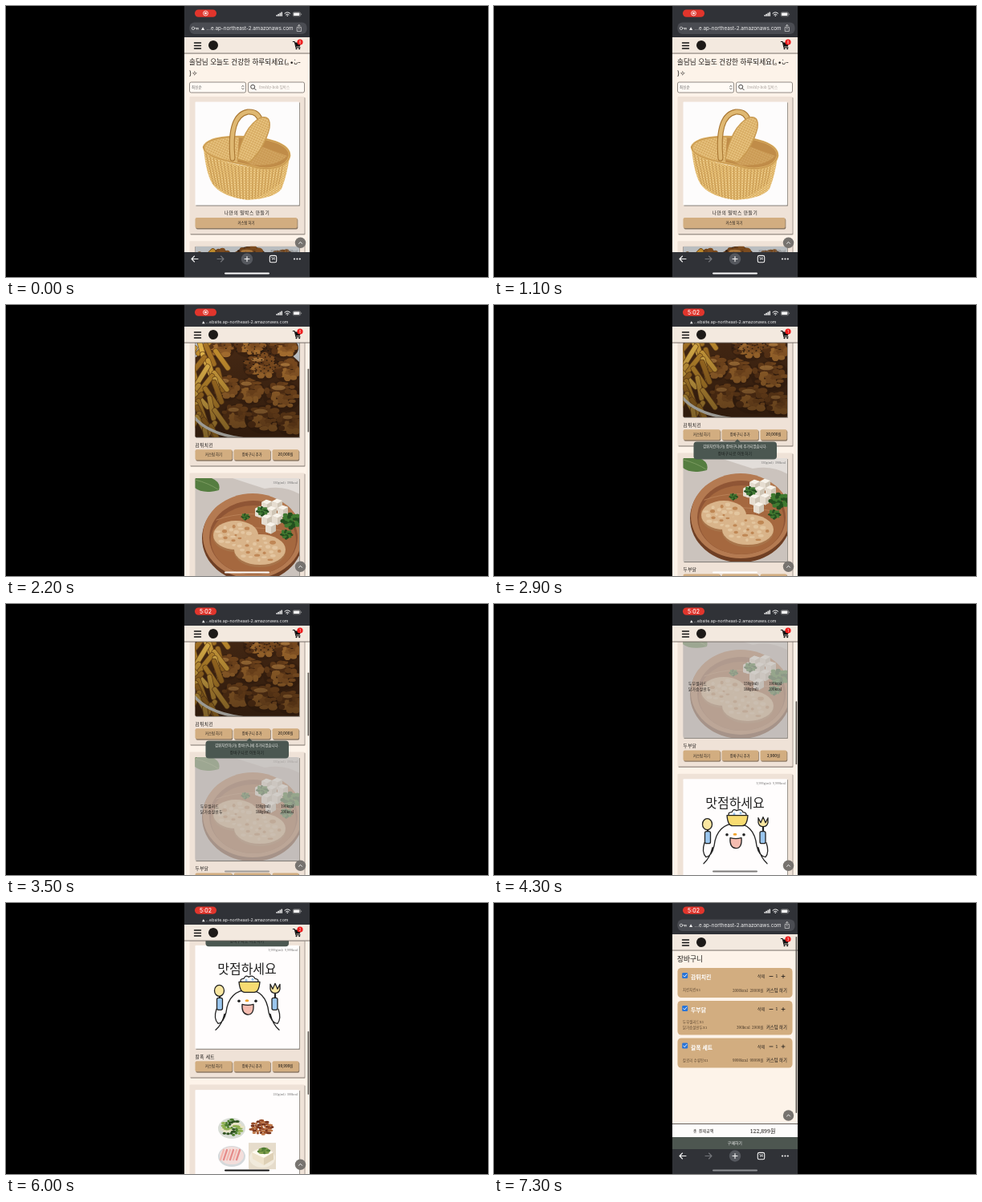
Animation of 600x338 px, one loop 7.4 s. Source, as an HTML page:

```html
<!DOCTYPE html>
<html lang="ko">
<head>
<meta charset="utf-8">
<title>밀박스</title>
<style>
html, body { margin: 0; width: 100%; height: 100%; overflow: hidden; background: #000; }
svg { display: block; width: 100vw; height: 100vh; }
text { font-family: Inter, "Noto Sans CJK KR", "Noto Sans CJK", sans-serif; white-space: pre; }
.serif { font-family: "Noto Serif", "Noto Sans CJK KR", "Noto Sans CJK", serif; font-weight: 300; }
.mid { text-anchor: middle; }
.end { text-anchor: end; }
</style>
</head>
<body>
<svg id="stage" viewBox="0 0 600 338"></svg>
<script>
const LOOP = 7400, CART_AT = 6900;
const INK = '#1d1a18', BAR = '#303237', TAN = '#d2ad80', CARD = '#efe2d7', PAGE = '#fdf3e9';

// ---- drawing helpers ----
const rect = (x, y, w, h, fill, r = 0, more = '') =>
  `<rect x="${x}" y="${y}" width="${w}" height="${h}" fill="${fill}" rx="${r}" ${more}/>`;
const oval = (x, y, rx, ry, fill, more = '') =>
  `<ellipse cx="${x}" cy="${y}" rx="${rx}" ry="${ry}" fill="${fill}" ${more}/>`;
const shape = (d, fill, more = '') => `<path d="${d}" fill="${fill}" ${more}/>`;
const line = (d, color, width = 1, more = '') =>
  shape(d, 'none', `stroke="${color}" stroke-width="${width}" stroke-linecap="round" stroke-linejoin="round" ${more}`);
const text = (x, y, size, str, cls = '', fill = INK, more = '') =>
  `<text x="${x}" y="${y}" font-size="${size}" class="${cls}" fill="${fill}" ${more}>${str}</text>`;
const group = (id, content, more = '') => `<g id="${id}" ${more}>${content}</g>`;
const spaced = n => `letter-spacing="${n}"`;
const repeat = (n, fn) => Array.from({ length: n }, (_, i) => fn(i)).join('');
const seeded = seed => () => (seed = (seed * 16807) % 2147483647) / 2147483647;

// Fills an ellipse evenly with n small parts.
const scatter = (n, x, y, rx, ry, part) => repeat(n, i => {
  const a = i * 2.4, d = Math.sqrt(i / n);
  return part(x + Math.cos(a) * rx * d, y + Math.sin(a) * ry * d, i);
});

// ---- food pictures, each drawn around its own top edge ----
function basket() {
  const rim = 'M246 176C249 166 270 163 290 163C326 163 354 172 353 187C350 202 326 206 306 200C282 194 247 190 246 176Z';
  const handle = 'M282 190C279 156 284 135 301 132Q314 131 317 144';
  const staves = repeat(23, i => {
    const x = 249 + i * 4.5, sag = Math.sin(i / 22 * Math.PI);
    return line(`M${x} ${184 + sag * 17}L${301 + (x - 301) * 0.82} ${222 + sag * 19}`, '#b9873f', 0.7);
  });
  return rect(235, 119, 131, 130, '#fdfcfc') +
    shape('M246 178Q249 209 257 222Q268 238 301 242Q334 240 343 228Q350 211 353 187Q330 206 300 200Q258 193 246 178Z', 'url(#weave)') + staves +
    shape(rim, '#c08c48') + shape('M289 190L320 176 350 187Q336 201 306 198Z', 'url(#wicker)', 'opacity=".45"') +
    shape('M246 176C249 166 270 163 290 163L288 195C266 191 247 188 246 176Z', 'url(#wicker)') +
    line(rim, '#dcb064', 2.6) + line(rim, '#a97532', 0.5) +
    line(handle, '#a97733', 7) + line(handle, '#dfb872', 4.8) +
    shape('M288 191Q295 151 317 139Q330 136 328 152Q322 177 303 195Z', 'url(#wicker)', 'stroke="#c8994f" stroke-width="1.3"');
}

function friedChicken() {
  const rnd = seeded(41), golds = ['#bd8a2d', '#ddb14a', '#a57224', '#cf9f3c'];
  const crust = ['#6f431c', '#8b5826', '#593316', '#7b4b1f', '#a06a2e'];
  const lumps = [[303, 296, 19, 17], [275, 292, 17, 16], [344, 302, 24, 19], [287, 328, 19, 16], [322, 331, 25, 18], [354, 337, 17, 15],
    [266, 242, 19, 14], [304, 239, 21, 15], [346, 242, 18, 13], [318, 266, 23, 17], [351, 271, 17, 14]]
    .map(([x, y, rx, ry]) => oval(x, y + 2, rx, ry, '#3a2110') +
      scatter(26, x, y, rx * 0.85, ry * 0.85, (px, py, i) => oval(px, py, 3 + rnd() * 3, 2 + rnd() * 2.5, crust[i % 5])) +
      oval(x - rx * 0.2, y - ry * 0.45, rx * 0.35, ry * 0.16, '#c08a48', 'opacity=".7"')).join('');
  const fries = repeat(30, i => {
    const x = 230 + rnd() * 34, y = 232 + i * 3.9, a = i % 3 ? 0.8 + rnd() * 0.6 : 2 + rnd() * 0.5;
    return line(`M${x} ${y}l${26 * Math.cos(a)} ${26 * Math.sin(a)}`, '#70491a', 7) +
      line(`M${x} ${y}l${26 * Math.cos(a)} ${26 * Math.sin(a)}`, golds[i % 4], 5.5);
  });
  const sesame = scatter(45, 318, 262, 24, 16, (x, y) => oval(x, y, 1, 0.7, '#1f160f')) +
    scatter(30, 302, 240, 40, 9, (x, y) => oval(x, y, 0.9, 0.7, '#241a12'));
  return rect(235, 226, 131, 130, '#432713') + shape('M235 226H366V262L340 238 270 234 235 256Z', '#b9bdc0') + lumps + sesame + fries +
    rect(235, 226, 131, 130, 'url(#shade)') + line('M234 330Q254 354 306 358', '#9a9994', 3.5);
}

function tofuPlate() {
  const rnd = seeded(9);
  const patty = (x, y, rx, ry) => oval(x, y + 3, rx, ry, '#a8744a') + oval(x, y, rx, ry, '#d9b48a') +
    scatter(26, x, y, rx * 0.85, ry * 0.8, (px, py, i) =>
      oval(px, py, 1.5 + rnd() * 2.4, 1 + rnd() * 1.5, i % 3 ? '#e6cba6' : '#b97c48', 'opacity=".8"'));
  const parsley = (x, y, r) => scatter(22, x, y, r, r * 0.8, (px, py, i) => oval(px, py, r / 4, r / 5, i % 2 ? '#23501f' : '#3f7a30'));
  const cube = ([x, y]) => shape(`M${x} ${y}l6-3.4 7 2.3v9l-6 3.4-7-2.3Z`, '#cfc5b5') + shape(`M${x} ${y}l6-3.4 7 2.3-6 3.4Z`, '#f8f3ea') +
    shape(`M${x} ${y}l7 2.3v9l-7-2.3Z`, '#e6ddd0');
  return rect(235, 216, 131, 130, '#cbc3bd') + shape('M282 216H366V236Q346 224 322 229Q300 222 282 216Z', '#e2ddd9') +
    shape('M235 216H256Q268 221 265 231Q245 236 235 228Z', '#557d40') + line('M236 218Q252 222 264 230', '#84a368', 0.8) +
    oval(307, 291, 63, 55, '#6f3f24') + oval(307, 288, 62, 53, '#b47a51') + oval(308, 290, 55, 46, '#8f5535') +
    oval(308, 293, 53, 43, '#a5683f') + line('M262 268Q300 254 345 266M258 282Q300 272 354 283', '#b98056', 1) +
    [[318, 246], [331, 245], [310, 254], [324, 254], [338, 253], [318, 264], [331, 263], [323, 274]].map(cube).join('') +
    parsley(319, 257, 7) + parsley(298, 264, 5) + parsley(355, 269, 12) + parsley(349, 286, 7) +
    patty(286, 287, 28, 18) + patty(316, 305, 32, 19);
}

function lunchDoodle() {
  const outline = 'stroke="#222" stroke-width="1.3" stroke-linejoin="round"';
  const sleeve = x => rect(x, 118, 7, 15, '#9ac6ee', 2, outline);
  return rect(235, 52, 131, 131, '#fffdfd') +
    text(300, 88, 16, '맛점하세요', 'mid', '#222', 'font-weight="300"') +
    line('M266 114V120M335 108V120', '#222', 2.2) + oval(265.5, 109, 6, 7, '#fae7a1', outline) +
    shape('M329 101V107Q330 112 335 112Q340 112 341 107V101L338 107 335 100 332 107Z', '#fae7a1', outline) +
    line('M262 132Q258 144 264 150Q271 149 274 136C276 117 287 108 301 108C315 108 325 117 327 136Q330 149 338 150Q343 144 339 132M272 138Q269 151 261 158M329 138Q332 151 340 158', '#222', 1.3) +
    sleeve(262.5) + sleeve(331) +
    shape('M293 99Q290 94 296 94Q298 89 302 92Q308 89 310 94Q316 95 313 99Z', '#fff', outline) +
    oval(299, 96, 1.5, 1.5, '#94bee5') + oval(307, 95, 1.5, 1.5, '#94bee5') +
    shape('M290 98H316Q315 111 309 111H297Q291 111 290 98Z', '#f8dc72', outline) +
    oval(290, 122, 1.8, 1.8, '#222') + oval(311, 122, 1.8, 1.8, '#222') + oval(300, 121.5, 2.4, 1.5, '#f0a32c') +
    shape('M294 126Q301 128 308 126Q309 139 301 139Q293 138 294 126Z', '#f4bcb0', outline);
}

function fourDishes() {
  const rnd = seeded(77);
  const pile = (x, y, rx, ry, colors) => scatter(38, x, y, rx, ry, (px, py, i) =>
    oval(px, py, 1.5 + rnd() * 2, 1.5, colors[i % colors.length]));
  return rect(235, 233, 131, 130, '#fffdfd') +
    oval(281, 281, 17, 13, '#d9ddd6') + pile(281, 280, 14, 10, ['#4b7d2c', '#8fb04f', '#e9e3c3', '#2f5220']) +
    pile(318, 280, 14, 9, ['#9a4e2a', '#77331b', '#bd7444']) +
    oval(281, 316, 17, 13, '#d5d9db') + oval(281, 315, 15, 11, '#f3dedb') +
    repeat(6, i => line(`M${271 + i * 4} 308l-4 12`, i % 2 ? '#e58d8b' : '#f3b6ae', 2.4)) +
    rect(302, 299, 34, 33, '#e6dccb') + oval(319, 318, 16, 12, '#f1eadc') +
    shape('M306 311L319 305 333 311 321 318Z', '#fffaf0') + shape('M306 311L321 318V327L307 319Z', '#eee2cb') +
    shape('M321 318L333 311V320L321 327Z', '#ded0b6') + pile(321, 309, 6, 3, ['#507b34', '#7f9d4a']);
}

// ---- shop page ----
const cardTop = i => 113 + 180.3 * i;
const products = [
  { name: '나만의 밀박스 만들기', art: basket, artTop: 119.5 },
  { name: '감튀치킨', art: friedChicken, artTop: 226, facts: '850g(ml)  2,000kcal', price: '20,000원' },
  { name: '두부닭', art: tofuPlate, artTop: 216, facts: '330g(ml)  390kcal', price: '2,900원' },
  { name: '칼폭 세트', art: lunchDoodle, artTop: 52.5, facts: '9,999g(ml)  9,999kcal', price: '99,999원' },
  { name: '한 접시', art: fourDishes, artTop: 233, facts: '250g(ml)  300kcal', price: '9,900원' },
];

const button = (x, w, label) => rect(x + 0.8, 152, w, 13.4, '#8d7a66', 2) + rect(x, 151, w, 13, TAN, 2) +
  text(x + w / 2, 159.2, 4.3, label, 'mid', INK, 'font-weight="500"');

const nutrition = group('nutrition', rect(235.5, 6.5, 129.5, 129, '#c0bcb8', 3, 'opacity=".68"') +
  [['두부샐러드', '150g(ml)', '190kcal'], ['닭가슴살만두', '180g(ml)', '200kcal']].map(([food, weight, energy], i) => {
    const y = 69.3 + i * 7;
    return text(242, y, 4.6, food, 'serif', INK, spaced(0.4)) + text(329, y, 4.4, weight, 'serif end') + text(358, y, 4.4, energy, 'serif end');
  }).join(''));

const card = (p, i) => `<g transform="translate(0 ${cardTop(i)})">` +
  rect(229.5, 1, 143, 171.5, '#a59b92', 1) + rect(228.5, 0, 143, 171, CARD, 1) +
  rect(236.5, 7.5, 129.3, 129, '#85807b') +
  `<g clip-path="url(#photo)"><g transform="translate(0 ${6.5 - p.artTop})">${p.art()}</g></g>` +
  (p.facts ? text(363, 13.4, 3.7, p.facts, 'serif end', '#777') : '') + (i === 2 ? nutrition : '') +
  (p.price
    ? text(235.5, 147.3, 5.7, p.name, 'serif', INK, spaced(0.4)) +
      button(235.5, 46, '커스텀 하기') + button(283.5, 45.5, '장바구니 추가') + button(331.5, 33, p.price)
    : text(300, 146.6, 5.8, p.name, 'serif mid', INK, spaced(0.5)) + button(235.5, 127, '커스텀 하기')) + '</g>';

const shopIntro =
  text(228, 73.2, 8.6, '솔담님 오늘도 건강한 하루되세요(｡•̀ᴗ-') + text(228, 87, 8.6, ')✧') +
  rect(228.5, 95, 70, 13, '#fffaf5', 2, 'stroke="#77706a" stroke-width=".8"') + text(231, 103, 4.6, '최신순', 'serif', '#666') +
  line('M293.6 100.6l1.2-1.5 1.2 1.5M293.6 102.6l1.2 1.5 1.2-1.5', '#333', 0.6) +
  rect(301.5, 95, 70, 13, '#fffaf5', 2, 'stroke="#77706a" stroke-width=".8"') +
  oval(307.2, 100.8, 2.5, 2.5, 'none', 'stroke="#333" stroke-width=".9"') + line('M309.2 102.8l2 2', '#333', 0.9) +
  text(315, 103, 4.5, 'freshly-bob 밀박스', 'serif', '#aaa49e');

const toast = group('toast', shape('M299.5 170.8l3.5-3.6 3.5 3.6Z', '#4b5751') + rect(248.5, 170.5, 103.5, 22, '#4b5751', 4) +
  text(300, 178.4, 4.4, '', 'mid', '#f2f2ee', 'id="toastText"') +
  text(300, 186.8, 4.5, '장바구니로 이동하기', 'serif mid', '#161a18', spaced(0.4)));

// ---- cart page ----
const cartItem = (y, h, name, parts, sum) => rect(228.5, y, 143, h, TAN, 4.5) +
  rect(234.2, y + 6, 7, 7, '#2874d8', 1.3) + line(`M235.9 ${y + 9.6}l1.4 1.5 2.6-3.2`, '#fff', 0.9) +
  text(245, y + 14, 6.9, name, '', '#fff', 'font-weight="600"') +
  text(328, y + 12.4, 4.8, '삭제', '', INK, 'font-weight="500"') + line(`M343 ${y + 10.5}h4M358 ${y + 10.5}h4M360 ${y + 8.5}v4`, INK, 0.8) +
  text(352, y + 12.4, 5, '1', 'serif mid') +
  parts.map((part, i) => text(235, y + h - 8 - 7 * (parts.length - 1 - i), 4.3, part, 'serif', '#5b4632', spaced(0.2))).join('') +
  text(335.5, y + h - 7.5, 4.6, sum, 'serif end', '#4d3c2b') + text(339, y + h - 7.5, 5.3, '커스텀 하기', '', INK, 'font-weight="500"');

const cartPage = rect(222, 0, 156, 338, PAGE) + text(228, 73.2, 8.7, '장바구니') +
  cartItem(81, 37, '감튀치킨', ['치킨치킨X1'], '2000kcal  20000원') +
  cartItem(122, 42.5, '두부닭', ['두부샐러드X1', '닭가슴살만두X1'], '390kcal  2900원') +
  cartItem(168.5, 37, '칼폭 세트', ['칼로리 수류탄X1'], '9999kcal  99999원') +
  rect(222, 275.5, 156, 17, '#fdfcfb') + rect(222, 275, 156, 0.9, '#55504c') +
  text(261, 285.8, 4.7, '총 결제금액', 'serif mid', INK, spaced(0.5)) + text(334.5, 286.6, 7, '122,899원', 'serif mid') +
  rect(222, 292, 156, 15, '#4d5650') + text(300, 301.2, 4.7, '구매하기', 'mid', '#fff', spaced(0.3));

// ---- fixed interface ----
const header = rect(222, 0, 156, 20, '#f3e9df') + rect(222, 19.6, 156, 0.9, '#6b635c') +
  line('M234.5 7h8M234.5 10.5h8M234.5 14h8', '#111', 1.4) + oval(258, 10, 6, 6, INK) +
  line('M357.3 5.5h2l1.6 7.2h5.2', '#111', 1.1) + shape('M359.6 6.6H367L365.8 11.6H360.8Z', '#111') +
  oval(361.5, 14.3, 1, 1, '#111') + oval(365.2, 14.3, 1, 1, '#111') +
  oval(366, 6, 3.6, 3.6, '#ee1c1c') + text(366, 7.5, 4.2, '0', 'mid', '#fff', 'id="badge"');

const warning = (x, y, s) => shape(`M${x} ${y}l${s} ${-s * 1.8} ${s} ${s * 1.8}Z`, '#eee');
const wideAddress = rect(228.5, 20.5, 146, 14.5, '#4a4c52', 6) +
  oval(233, 27.8, 1.7, 1.7, 'none', 'stroke="#ddd" stroke-width=".8"') + line('M234.8 27.8h4.4M237.5 27.8v1.4M239.2 27.8v1.4', '#ddd', 0.8) +
  warning(243, 30, 2.1) + text(249.5, 30, 6.3, '...e.ap-northeast-2.amazonaws.com', '', '#f1f1f1') +
  line('M363.5 26.5h-1.3v5h5.2v-5h-1.3M364.8 29v-5.4M363.2 25l1.6-1.6 1.6 1.6', '#ddd', 0.7);
const slimAddress = warning(244, 23.3, 1.8) + text(248.5, 23.4, 5.3, '...ebsite.ap-northeast-2.amazonaws.com', '', '#f1f1f1');

const statusBar = rect(235, 4.5, 27, 9.3, '#e1352c', 4.6) +
  group('recording', oval(248.5, 9.1, 2.9, 2.9, 'none', 'stroke="#fff" stroke-width=".8"') + oval(248.5, 9.1, 1.4, 1.4, '#fff')) +
  group('clock', text(248.5, 11.6, 6.9, '5:02', 'mid', '#fff', 'font-weight="500"')) +
  repeat(4, i => rect(336.5 + i * 2, 11 - i * 1.2, 1.4, 1.8 + i * 1.2, '#fff', 0.4)) +
  line('M347 9.2Q350.3 6.4 353.6 9.2M348.5 10.9Q350.3 9.4 352.1 10.9', '#fff', 1) + oval(350.3, 12.2, 0.7, 0.7, '#fff') +
  rect(357.2, 7.8, 9.4, 5, 'none', 1.4, 'stroke="#aaa" stroke-width=".6"') + rect(358, 8.6, 7.4, 3.4, '#fff', 0.7) + rect(367.3, 9.4, 0.8, 1.8, '#aaa', 0.4);

const toolbar = rect(222, 307, 156, 32, BAR) + line('M239 315.5h-8M234.5 312l-3.5 3.5 3.5 3.5', '#f4f4f4', 1.1) +
  line('M263 315.5h8M267.5 312l3.5 3.5-3.5 3.5', '#74767b', 1.1) +
  oval(300, 315.5, 7.2, 7.2, '#55585e') + line('M297 315.5h6M300 312.5v6', '#f4f4f4', 1.1) +
  rect(328.3, 311.4, 8.4, 8.4, 'none', 1.8, 'stroke="#f4f4f4" stroke-width="1.1"') + text(332.5, 317.3, 4.4, '14', 'mid', '#fff', 'font-weight="600"') +
  repeat(3, i => oval(359 + i * 3.4, 315.5, 1.1, 1.1, '#f4f4f4'));

stage.innerHTML = `<defs>
  <clipPath id="screen"><rect x="222" width="156" height="338"/></clipPath>
  <clipPath id="photo"><rect x="235.5" y="6.5" width="129.5" height="129" rx="1"/></clipPath>
  <linearGradient id="shade" x2="0" y2="1"><stop offset=".2" stop-color="#1c0f06" stop-opacity="0"/><stop offset="1" stop-color="#1c0f06" stop-opacity=".5"/></linearGradient>
  <pattern id="weave" width="4" height="3" patternUnits="userSpaceOnUse">${rect(0, 0, 4, 3, '#dcb064') + rect(0, 0, 2, 1.5, '#edcd8c') + rect(2, 1.5, 2, 1.5, '#e8c37a')}</pattern>
  <pattern id="wicker" width="3" height="3" patternUnits="userSpaceOnUse" patternTransform="rotate(25)">${rect(0, 0, 3, 3, '#deb46c') + rect(0, 0, 1.5, 1.5, '#eccb8a') + rect(1.5, 2.3, 1.5, 0.7, '#c6964e')}</pattern>
  </defs>` + rect(0, 0, 600, 338, '#000') + group('phone',
  rect(222, 0, 156, 338, PAGE) + group('list', shopIntro + products.map(card).join('') + toast) +
  group('cart', cartPage) + group('header', header) +
  group('toTop', oval(366.5, 0, 6.7, 6.7, '#77736f') + line('M364.5 1l2-2 2 2', '#fff', 0.9)) +
  rect(375.6, 0, 1.5, 79, '#4e4a47', 0.7, 'id="scrollbar"') +
  rect(222, 0, 156, 39, BAR, 0, 'id="topBar"') + group('wide', wideAddress) + group('slim', slimAddress) + statusBar +
  group('toolbar', toolbar) + rect(272, 332.4, 56, 2.2, '#fff', 1.1, 'id="home"'), 'clip-path="url(#screen)"');

// ---- motion ----
// Each flick of the list: time and scroll position, at rest in between.
const scrollKeys = [[0, 0], [1600, 0], [1800, 74.5], [2200, 264], [2400, 289], [3500, 289], [4000, 442.2], [5600, 442.2], [6000, 607.6], [7400, 607.6]];
// Taps on "add to cart": start, product, end of its message.
const additions = [[2900, 1, 4300], [5100, 2, 6300], [6400, 3, CART_AT]];

// Cubic curve through the keys, resting wherever a neighbour stands still.
function scrollAt(t) {
  const k = scrollKeys;
  const slope = i => !k[i - 1] || !k[i + 1] || k[i][1] === k[i - 1][1] || k[i][1] === k[i + 1][1]
    ? 0 : (k[i + 1][1] - k[i - 1][1]) / (k[i + 1][0] - k[i - 1][0]);
  const i = k.findIndex((key, n) => n < k.length - 1 && t < k[n + 1][0]);
  const [t0, a] = k[i], [t1, b] = k[i + 1], d = t1 - t0, u = (t - t0) / d, u2 = u * u, u3 = u2 * u;
  return a + (b - a) * (3 * u2 - 2 * u3) + d * (slope(i) * (u3 - 2 * u2 + u) + slope(i + 1) * (u3 - u2));
}

const el = id => document.getElementById(id);
const move = (id, y) => el(id).setAttribute('transform', `translate(0 ${y})`);
const fade = (id, opacity) => el(id).setAttribute('opacity', opacity);
const set = (id, attrs) => Object.entries(attrs).forEach(([k, v]) => el(id).setAttribute(k, v));
const within = (t, a, b) => t >= a && t < b;

function draw(t) {
  const inCart = t >= CART_AT, scroll = scrollAt(t);
  const collapse = inCart ? 0 : Math.min(1, Math.max(0, (t - 1600) / 200));
  const top = 39 - 12 * collapse;

  move('list', -scroll);
  move('header', top);
  move('toolbar', 31 * collapse);
  move('toTop', inCart ? 265 : 295.3 + 31 * collapse);
  set('topBar', { height: top });
  fade('wide', 1 - collapse);
  fade('slim', collapse);
  fade('cart', +inCart);
  fade('nutrition', +within(t, 3400, 5100));
  fade('recording', +(t < 2800));
  fade('clock', +(t >= 2800));

  const barShown = inCart || within(t, 1600, 2900) || within(t, 3400, 5000) || within(t, 5500, 6600);
  fade('scrollbar', +barShown);
  set('scrollbar', inCart ? { y: 42, height: 220 } : { y: 17.8 + 0.234 * scroll, height: 79 });

  el('badge').textContent = additions.filter(([at]) => t >= at).length;
  const added = additions.find(([from, , to]) => within(t, from, to));
  fade('toast', +!!added);
  if (added) {
    move('toast', cardTop(added[1]) - 4.2);
    el('toastText').textContent = products[added[1]].name + '이(가) 장바구니에 추가되었습니다.';
  }
  set('home', { fill: inCart ? '#8e9094' : t < 3000 ? '#fff' : t < 4000 ? '#a09d9a' : t < 5600 ? '#7c7a79' : '#111' });
}

function tick(now) {
  draw(Math.floor(now % LOOP / 100) * 100);
  requestAnimationFrame(tick);
}
tick(performance.now());
</script>
</body>
</html>
```
